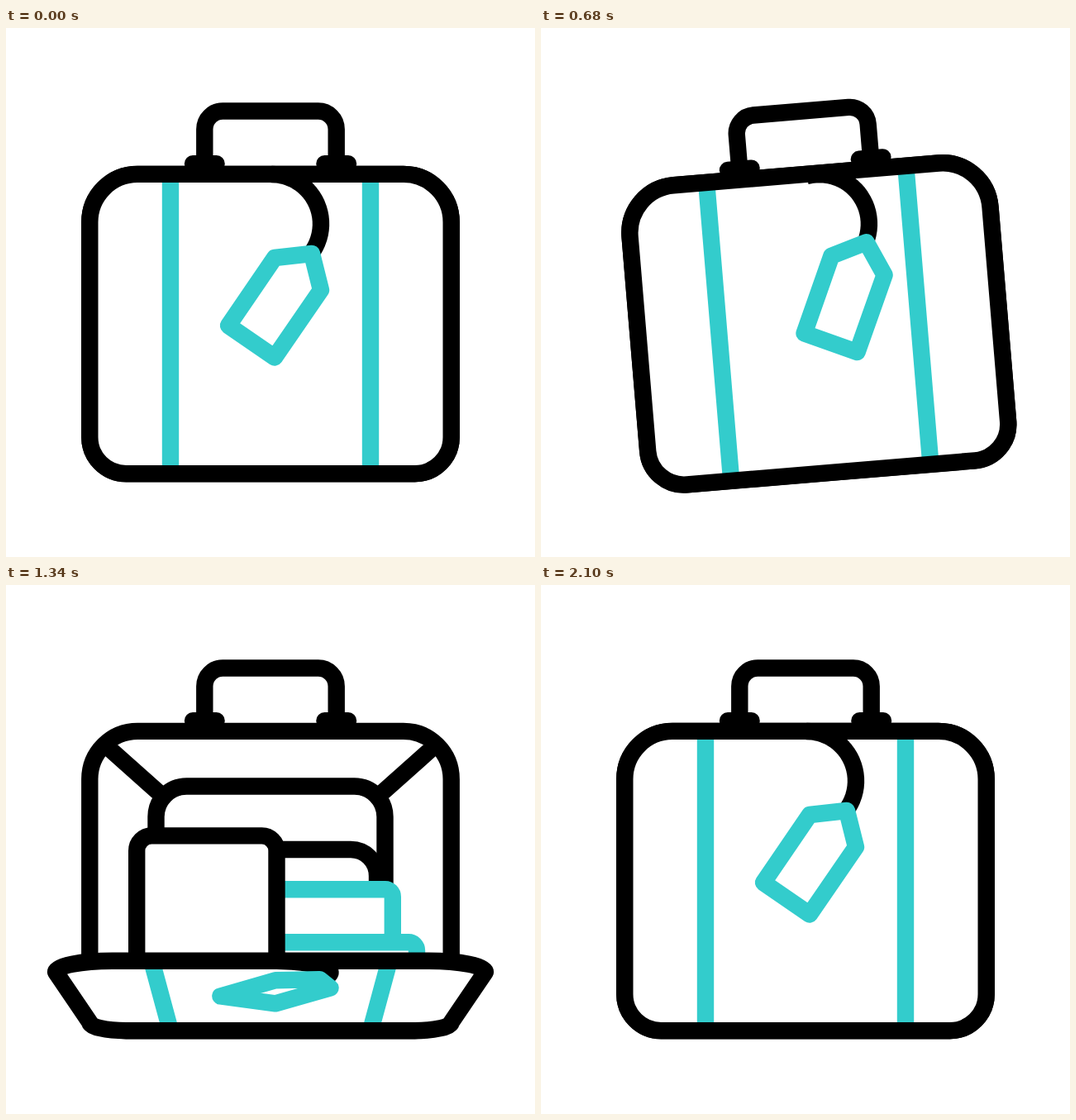
An HTML page that plays this animation: 640x640 px, repeating every 2400 ms.

```html
<!DOCTYPE html>
<html lang="en">
<head>
<meta charset="utf-8">
<title>Suitcase</title>
<style>
  html, body { margin: 0; width: 100%; height: 100%; overflow: hidden; background: #fff; }
  svg { display: block; width: 100%; height: 100%; }
  path { stroke-width: 20.4; stroke-linejoin: round; }
  .ink { stroke: #000; fill: none; }
  .teal { stroke: #33cccc; fill: none; }
  .solid { fill: #fff; }
</style>
</head>
<body>
<svg viewBox="0 0 640 640">
  <g id="case">
    <path class="ink" d="M240.3 165V122.5a22 22 0 0 1 22-22H377.7a22 22 0 0 1 22 22V165"/>
    <path class="ink" stroke-linecap="round" d="M226 164.2H254.6M385.4 164.2H414"/>
    <path class="ink solid" d="M101.3 495V235a58 58 0 0 1 58-58.1H480.7a58 58 0 0 1 58 58.1V495a44 44 0 0 1 -44 44H145.3a44 44 0 0 1 -44 -44Z"/>
    <path class="ink" d="M124 197L188 254M516 197L452 254"/>
    <path class="ink solid" d="M181.5 535V281a37 37 0 0 1 37-37.5H421.5a37 37 0 0 1 37 37.5V535"/>
    <path class="ink solid" d="M328 320H417a32 32 0 0 1 32 32V535"/>
    <path class="teal solid" d="M328 368.2H458.8a9 9 0 0 1 9 9V535"/>
    <path class="teal solid" d="M328 432.2H487a10 10 0 0 1 10 10V535"/>
    <path class="ink solid" d="M158.2 535V321.4a18 18 0 0 1 18-18H309.5a18 18 0 0 1 18 18V535"/>
    <path id="panel" class="solid"/>
    <path id="straps" class="teal"/>
    <path id="string" class="ink"/>
    <path id="rim" class="ink"/>
    <path id="tag" class="teal solid"/>
  </g>
</svg>
<script>
const LOOP = 2400, BASE = 539.2, HEIGHT = 362.3, MID = 320;

// [time in ms, value], eased between neighbours
const caseAngle = [[0, 0], [118, -7], [352, 14.6], [580, -15.4], [800, 9], [930, 0],
  [1060, 0], [1120, 2.2], [1200, -2.2], [1270, 1], [1330, 0]];
const tagAngle = [[0, 0], [90, 5], [270, -11], [505, 8.2], [705, -10.9], [880, 5], [1000, 0],
  [1440, 0], [1600, 4], [1760, -5], [1900, 3], [2010, -1.5], [2100, 0]];
const flapOpen = [[918, 0], [1098, 0.831], [1255, 0.831], [1735, 0]];

const stringArc = Array.from({ length: 25 }, (_, i) => {
  const a = (-90 + i * 5.1) * Math.PI / 180;
  return [321 + 60 * Math.cos(a), 237 + 60 * Math.sin(a)];
});
const tagShape = [[325, 278], [370, 273], [381, 317], [325, 398.5], [269, 360]];

const byId = id => document.getElementById(id);
const draw = (id, d) => byId(id).setAttribute('d', d);

function valueAt(keys, t) {
  if (t <= keys[0][0]) return keys[0][1];
  for (let i = 1; i < keys.length; i++) {
    const [t0, v0] = keys[i - 1], [t1, v1] = keys[i];
    if (t < t1) return v0 + (v1 - v0) * (1 - Math.cos(Math.PI * (t - t0) / (t1 - t0))) / 2;
  }
  return keys[keys.length - 1][1];
}

function rotate([x, y], degrees, px, py) {
  const a = degrees * Math.PI / 180, c = Math.cos(a), s = Math.sin(a);
  return [px + (x - px) * c - (y - py) * s, py + (x - px) * s + (y - py) * c];
}

const line = points => 'M' + points.map(p => p.map(v => v.toFixed(2)).join(' ')).join('L');

function render(t) {
  const open = valueAt(flapOpen, t);
  const squash = 1 - open, widen = 1 + 0.246 * open;
  const lower = y => BASE - (BASE - y) * squash;
  const tilt = ([x, y]) => [MID + (x - MID) * widen, lower(y)];
  const swing = valueAt(tagAngle, t);
  const hang = p => tilt(rotate(p, swing, 333, 181));

  byId('case').setAttribute('transform', `rotate(${valueAt(caseAngle, t)} 320 168)`);

  // Half outline from the top centre down to the bottom centre, mirrored by side
  const top = BASE - HEIGHT;
  const half = side => {
    const wide = d => MID + side * d * widen, fixed = d => MID + side * d;
    return `M${MID} ${lower(top)}H${wide(161)}` +
      `C${wide(193)} ${lower(top)} ${wide(218.7)} ${lower(203)} ${wide(218.7)} ${lower(235)}` +
      `L${fixed(218.7)} ${lower(495)}` +
      `C${fixed(218.7)} ${lower(519.4)} ${fixed(199)} ${BASE} ${fixed(174.7)} ${BASE}H${MID}`;
  };
  const outline = half(-1) + half(1);
  draw('panel', outline);
  draw('rim', outline);
  draw('straps', [-121, 121].map(d =>
    line([tilt([MID + d, top]), [MID + d, BASE]])).join(''));
  draw('string', line(stringArc.map(hang)));
  draw('tag', line(tagShape.map(hang)) + 'Z');
}

const start = performance.now();
function tick() {
  render((performance.now() - start) % LOOP);
  requestAnimationFrame(tick);
}
render(0);
requestAnimationFrame(tick);
</script>
</body>
</html>
```
